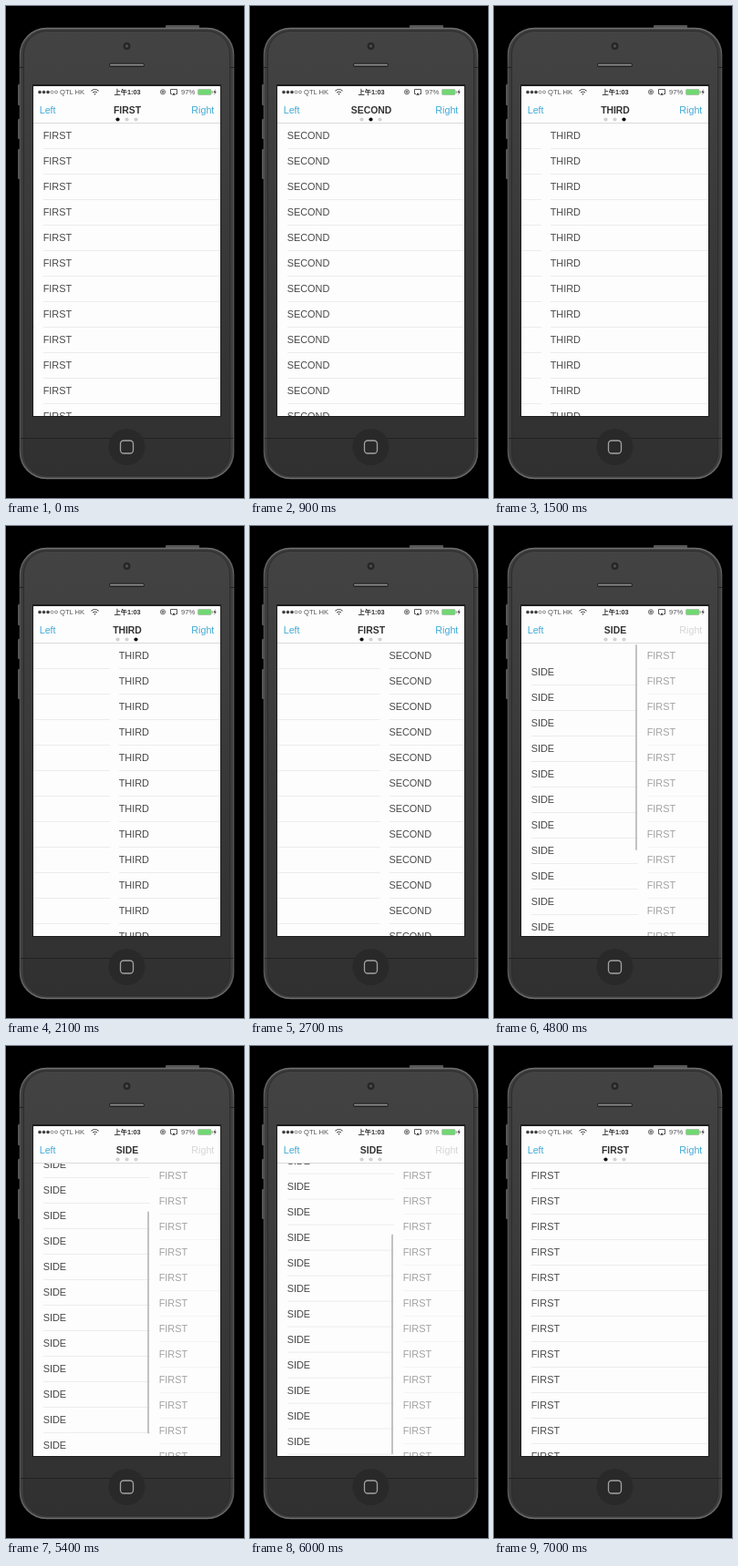
Animation of 261 by 540 pixels, one loop 7.2 s. Source, as an HTML page:

```html
<!DOCTYPE html>
<html lang="en">
<head>
<meta charset="utf-8">
<style>
  html, body { margin: 0; width: 100%; height: 100%; overflow: hidden; background: #000; }
  svg { display: block; width: 100%; height: 100%; }
  text { font-family: "Liberation Sans", Arial, sans-serif; }
  .row { font-size: 10.9px; fill: #484848; }
  .nav { font-size: 10.7px; fill: #3fa9d6; }
  .title { font-size: 10.4px; font-weight: bold; fill: #333; text-anchor: middle; }
  .status { font-size: 7.6px; fill: #555; }
  .clock { font: bold 7.3px "Liberation Sans", "Noto Sans CJK TC", "Noto Sans CJK", sans-serif; fill: #333; text-anchor: middle; }
  .line { stroke: #ececec; }
</style>
</head>
<body>
<svg viewBox="0 0 261 540">
  <defs>
    <linearGradient id="face" x2="0" y2="1">
      <stop offset="0" stop-color="#434343"/>
      <stop offset=".5" stop-color="#383838"/>
      <stop offset="1" stop-color="#303030"/>
    </linearGradient>
    <linearGradient id="rim" x2="0" y2="1">
      <stop offset="0" stop-color="#707070"/>
      <stop offset=".08" stop-color="#505050"/>
      <stop offset=".93" stop-color="#505050"/>
      <stop offset="1" stop-color="#707070"/>
    </linearGradient>
    <clipPath id="list"><rect x="30" y="128" width="205" height="322"/></clipPath>
  </defs>
  <rect width="261" height="540"/>

  <g fill="#565656">
    <rect x="175" y="21" width="37" height="4" rx="1"/>
    <rect x="13" y="86" width="4" height="23" rx="1"/>
    <rect x="13" y="124" width="4" height="22" rx="1"/>
    <rect x="13" y="157" width="4" height="33" rx="1"/>
  </g>
  <rect x="15.5" y="24.5" width="234" height="494" rx="29" fill="#3c3c3c" stroke="url(#rim)" stroke-width="1.6"/>
  <rect x="19.5" y="27.5" width="226" height="488" rx="25" fill="url(#face)" stroke="#2c2c2c"/>
  <path d="M15 67.5h4M246 67.5h4M16 474.5h233" stroke="#222"/>
  <circle cx="132.5" cy="44" r="4.5" fill="#252525" stroke="#444"/>
  <circle cx="132.5" cy="44" r="1.8" fill="#4b4b50"/>
  <rect x="113" y="62.5" width="39" height="4.5" rx="2.2" fill="#222"/>
  <path d="M115 64.7h35" stroke="#8b8b8b" stroke-width="1.8" stroke-linecap="round"/>
  <circle cx="132.5" cy="484" r="20" fill="#292929"/>
  <rect x="125.5" y="477" width="14" height="14" rx="3.5" fill="none" stroke="#a2a2a2" stroke-width="1.3"/>

  <rect x="29" y="86" width="207" height="365" fill="#1c1c1c"/>
  <rect x="30" y="88" width="205" height="362" fill="#fdfdfd"/>
  <g id="signal" stroke="#444" stroke-width=".6"></g>
  <text class="status" x="59" y="97">QTL HK</text>
  <g fill="none" stroke="#444" stroke-width="1">
    <path d="M93.3 93.2q4.2-3.4 8.4 0M95 95q2.5-2 5 0"/>
    <circle cx="97.5" cy="96.7" r=".5"/>
    <circle cx="172" cy="94.3" r="2.6" stroke-width=".8"/>
    <path d="M171 95h2v-1.3h-2z" stroke-width=".8"/>
    <path d="M182 96.5h-1.5v-5h7v5H186" stroke-width=".9"/>
    <path d="M182 97.7h4l-2-2.5z" fill="#333" stroke="none"/>
  </g>
  <text class="clock" x="133" y="97">上午1:03</text>
  <text class="status" x="192" y="97">97%</text>
  <rect x="210.5" y="91.5" width="14.5" height="6" rx="1" fill="#6fd870" stroke="#a5b5a5" stroke-width=".7"/>
  <path d="M226.2 93.3v2.4" stroke="#888"/>
  <path d="M229.8 91l-2.4 4h1.6l-.8 3 2.6-4.2h-1.6z" fill="#444"/>

  <text class="nav" x="36.7" y="118.3">Left</text>
  <text class="title" id="title" x="133" y="118.2"></text>
  <text class="nav" id="right" x="228.3" y="118.3" text-anchor="end">Right</text>
  <g id="dots"></g>
  <g id="pages" clip-path="url(#list)"></g>
  <path d="M30 128.5h205" stroke="#dadada"/>
</svg>
<script>
const LOOP = 7200, STEP = 100;
const LEFT = 31, TOP = 128, WIDTH = 204, ROW = 28, ROWS = 15;
const SIDE_WIDTH = 127, MAX_SCROLL = 98, BAR = 244;
const $ = id => document.getElementById(id);

// Each gesture adds its distance between its start and end times.
const swipes = [
  { start: 0, end: 800, by: WIDTH },
  { start: 900, end: 1700, by: WIDTH },
  { start: 1800, end: 2100, by: -83 },
  { start: 2200, end: 3025, by: 83 - 2 * WIDTH },
  { start: 3600, end: 4000, by: -SIDE_WIDTH },
  { start: 6300, end: 7000, by: SIDE_WIDTH }
];
const scrolls = [
  { start: 4700, end: 4900, by: -33 },
  { start: 4950, end: 5700, by: 143 },
  { start: 5700, end: 6150, by: -12 }
];

const clamp = (v, min, max) => Math.min(max, Math.max(min, v));
const ease = x => 1 - (1 - x * x) ** 2.75;
const travel = (gestures, t) => gestures.reduce(
  (sum, { start, end, by }) => sum + by * ease(clamp((t - start) / (end - start), 0, 1)), 0);

function add(parent, tag, attrs, text = "") {
  const node = document.createElementNS("http://www.w3.org/2000/svg", tag);
  for (const name in attrs) node.setAttribute(name, attrs[name]);
  node.textContent = text;
  return parent.appendChild(node);
}

function makePage(label, width) {
  const page = add($("pages"), "g", {});
  const rows = add(page, "g", {});
  for (let i = 0; i < ROWS; i++) {
    const y = TOP + i * ROW;
    add(rows, "text", { class: "row", x: 40.7, y: y + 18 }, label);
    add(rows, "path", { class: "line", d: `M41 ${y + 28.5}H${LEFT + width}` });
  }
  return { page, rows };
}

const pages = ["FIRST", "SECOND", "THIRD"].map(label => makePage(label, WIDTH));
const side = makePage("SIDE", SIDE_WIDTH);
const bar = add(side.page, "rect", { x: 155, width: 2, rx: 1, fill: "#c2c2c2" });
const dots = [0, 1, 2].map(i => add($("dots"), "circle", { cx: 122.5 + i * 10, cy: 124.5, r: 2.1 }));
for (let i = 0; i < 5; i++)
  add($("signal"), "circle", { cx: 37 + i * 4.5, cy: 94.5, r: 1.5, fill: i < 3 ? "#333" : "none" });

const move = (node, x, y) => node.setAttribute("transform", `translate(${x} ${y})`);

function draw(t) {
  const pos = travel(swipes, t), scroll = travel(scrolls, t);
  const opened = Math.max(0, -pos / SIDE_WIDTH);
  const current = opened > .5 ? -1 : Math.max(0, Math.round(pos / WIDTH));

  pages.forEach(({ page }, i) => move(page, i * WIDTH - pos, 0));
  pages[0].page.setAttribute("opacity", 1 - .5 * opened);
  move(side.page, -SIDE_WIDTH - pos, 0);
  move(side.rows, 0, -scroll);

  // The indicator shrinks by the distance pulled past either end.
  const inside = clamp(scroll, 0, MAX_SCROLL);
  const length = BAR - Math.abs(scroll - inside);
  bar.setAttribute("y", scroll > MAX_SCROLL ? 448 - length : 130 + 74 * inside / MAX_SCROLL);
  bar.setAttribute("height", length);
  bar.setAttribute("opacity", t >= 4800 && t < 6200 ? 1 : 0);

  $("title").textContent = ["SIDE", "FIRST", "SECOND", "THIRD"][current + 1];
  $("right").style.fill = current < 0 ? "#d6d6d6" : "";
  dots.forEach((dot, i) => dot.setAttribute("fill", i === current ? "#111" : "#d2d2d2"));
}

const start = performance.now();
function tick() {
  const t = (performance.now() - start) % LOOP;
  draw(Math.floor(t / STEP) * STEP);
  requestAnimationFrame(tick);
}
tick();
</script>
</body>
</html>
```
